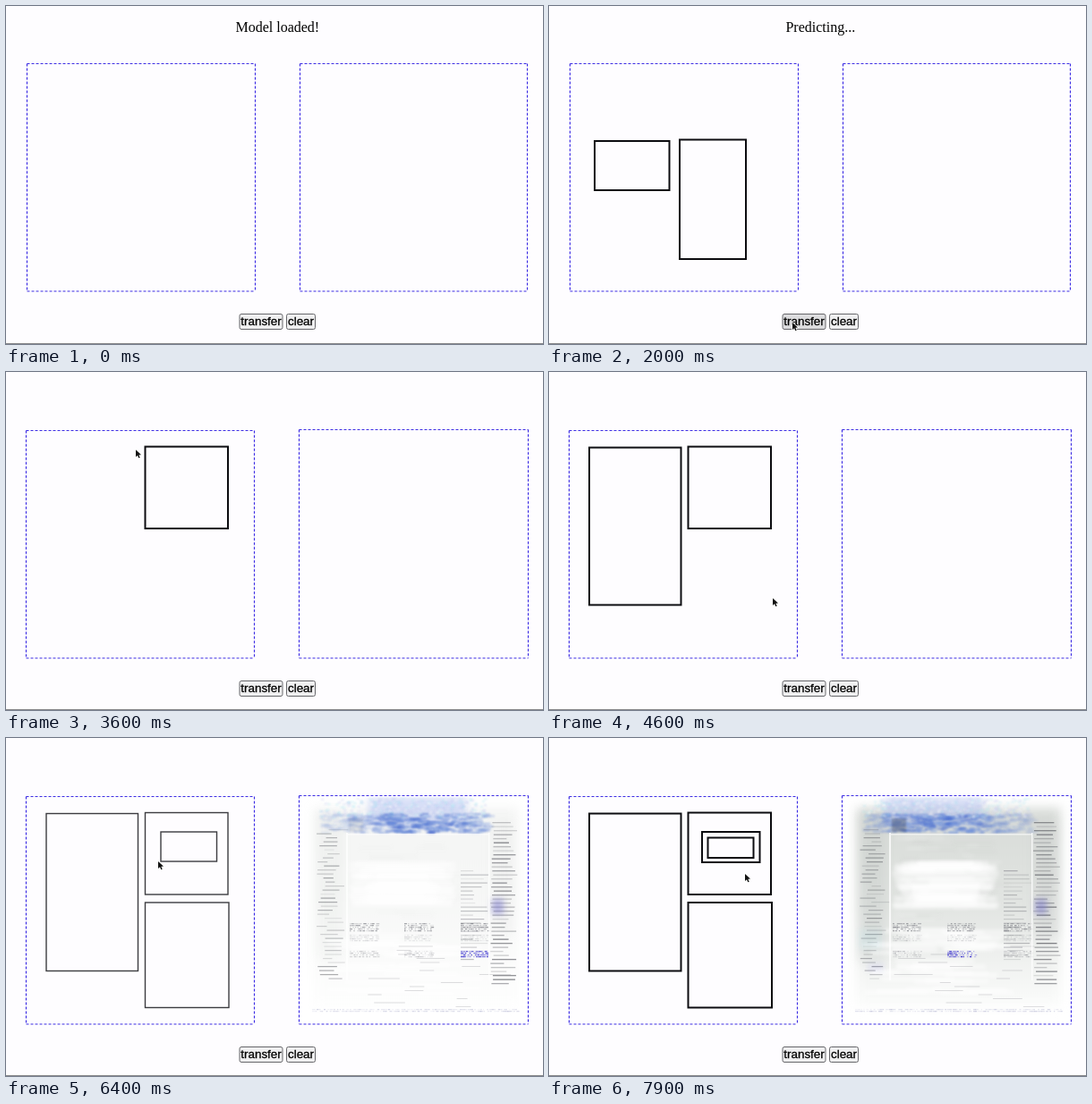
Animation of 600 by 378 pixels, one loop 8 s. Source, as an HTML page with a canvas:

```html
<!DOCTYPE html>
<html lang="en">
<head>
<meta charset="utf-8">
<title>Sketch transfer</title>
<style>
html, body { margin: 0; width: 100%; height: 100%; overflow: hidden; background: #fefdff; }
canvas { display: block; }
</style>
</head>
<body>
<canvas id="stage" width="600" height="378"></canvas>
<script>
const LOOP = 8000, STEP = 100, CLEARED = 3100;
const ctx = document.getElementById('stage').getContext('2d');

// Dragged boxes: start and end time, first and last corner
const boxes = [
  { from: 200, to: 400, a: [51, 151], b: [134.5, 206] },
  { from: 500, to: 800, a: [146, 149.5], b: [220, 283] },
  { from: 3200, to: 3500, a: [248, 83.5], b: [155.5, 175] },
  { from: 3700, to: 4000, a: [147.5, 84.5], b: [45, 260.5] },
  { from: 5000, to: 5400, a: [249, 184], b: [155.5, 301.5] },
  { from: 6200, to: 6500, a: [235.5, 105], b: [171, 139] },
  { from: 6600, to: 6900, a: [228.5, 111.5], b: [177.5, 134] }
];

// Visits to the transfer button
const visits = [
  { arrive: 1100, click: 1100, done: 2800 },
  { arrive: 4200, click: 4200, done: 4500 },
  { arrive: 5700, click: 5900, done: 6000 },
  { arrive: 7200, click: 7600, done: 7600 }
];

// The pointer passes through every drag, every visit and a few resting places
const LAG = 3;
const path = [
  ...boxes.flatMap(({ from, to, a, b }) =>
    [[from, a[0] - LAG, a[1]], [to, b[0] - LAG, b[1]]]),
  ...visits.flatMap(({ arrive, done }) => [[arrive, 272, 354], [done, 272, 354]]),
  [1000, 225, 313], [CLEARED, 328, 355], [3600, 145, 87], [4600, 250, 253],
  [5200, 165, 270], [6400, 170, 138], [7700, 220, 150], [7900, 219, 152]
].sort((p, q) => p[0] - q[0]);

function pointerAt(t) {
  const next = path.findIndex(([time]) => time > t);
  if (next === 0) return null;
  if (next < 0) return path[path.length - 1].slice(1);
  const [t0, x0, y0] = path[next - 1], [t1, x1, y1] = path[next];
  const u = (t - t0) / (t1 - t0);
  return [x0 + (x1 - x0) * u, y0 + (y1 - y0) * u];
}

function random(seed) {
  return () => {
    seed = (seed + 0x6d2b79f5) | 0;
    let v = Math.imul(seed ^ (seed >>> 15), seed | 1);
    v ^= v + Math.imul(v ^ (v >>> 7), v | 61);
    return ((v ^ (v >>> 14)) >>> 0) / 4294967296;
  };
}

// A smeared web page: haze, blue header, side columns and text patches
function makeResult({ seed, haze, peak, link, tint }) {
  const canvas = document.createElement('canvas');
  canvas.width = 600;
  canvas.height = 378;
  const g = canvas.getContext('2d'), rnd = random(seed);
  const range = (lo, hi) => lo + rnd() * (hi - lo);
  const pick = list => list[Math.floor(rnd() * list.length)];
  const bar = (color, x, y, w, h, alpha) => {
    g.globalAlpha = alpha;
    g.fillStyle = color;
    g.fillRect(x, y, w, h);
  };
  const blurred = (radius, paint) => {
    g.filter = `blur(${radius}px)`;
    paint();
    g.filter = 'none';
  };
  const words = (x, y, w, h, color, alpha) => {
    for (let row = y; row < y + h; row += 2)
      for (let at = x; at < x + w; at += range(2, 5))
        bar(color, at, row, range(1, 4), 1.3, alpha * range(.2, 1));
  };

  g.beginPath();
  g.rect(329, 66, 254, 253);
  g.clip();
  bar('#fff', 329, 66, 254, 253, 1);

  const fade = g.createLinearGradient(0, 75, 0, 300);
  fade.addColorStop(0, '#d3d7d3');
  fade.addColorStop(.5, '#dfe2df');
  fade.addColorStop(1, '#fbfcfb');
  blurred(6, () => {
    bar(fade, 344, 78, 228, 222, haze);
    bar('#c2c8c6', 346, 84, 30, 165, haze * .4);
    bar('#c2c6c6', 542, 95, 26, 125, haze * .35);
  });

  // Ragged white gaps in the middle and below
  blurred(2, () => {
    for (let i = 0; i < 45; i++) {
      const half = range(28, 60);
      bar('#fff', 443 - half, range(138, 186), half * 2, 5, .55);
      bar('#fff', range(350, 470), range(212, 285), range(30, 90), 4, .6);
      bar(pick(['#fff', '#c9cdca']), range(384, 480), range(110, 205), range(10, 55), 2, haze * .35);
    }
  });

  // Header, deepest around its peak
  blurred(5, () => bar('#a9b8f0', peak - 60, 66, 110, 30, .45));
  blurred(1, () => {
    for (let i = 0; i < 330; i++) {
      const x = range(350, 536), depth = Math.exp(-(((x - peak) / 60) ** 2));
      const shade = pick(['#3c62cc', '#5d82d8', '#7a9be0']);
      bar(shade, x, range(84, 105), range(3, 14), 2, .12 + .45 * depth);
      bar(pick(['#a5e6f4', '#c0c6f4', '#fff']), x, range(67, 88), 3, 1.5, .5);
    }
    bar('#475063', 383, 90, 16, 15, haze * .45);
  });

  // Ruled side columns
  for (let y = 94; y < 278; y += 4.5) {
    bar('#45464e', 541 + range(0, 4), y, range(14, 28), 1.3, range(.15, .65));
    if (y < 265) bar('#54565c', 347 + range(0, 14), y + 8, range(10, 22), 1.2, range(.1, .5));
    if (y > 145 && y < 250) bar('#5c5d66', 508, y, range(12, 31), 1.2, range(.1, .4));
    if (y > 205) bar('#7c7e84', range(384, 530), y + 26, range(10, 45), 1, .25);
  }

  // Three text blocks, one with a blue link
  [384, 445, 508].forEach((x, i) => {
    words(x, 207, 30, 10, '#555660', .55);
    words(x, 220, 30, 8, '#777880', .25);
    words(x, 238, 31, 7, i === link ? '#4038d0' : '#6c6d76', i === link ? .95 : .35);
  });
  words(342, 303, 230, 3, '#9a9cc0', .4);

  blurred(3, () => {
    bar('#8fe3f2', 346, 214, 26, 22, tint);
    bar('#6a70ec', 356, 252, 18, 9, tint);
    bar('#7b78cc', 543, 180, 13, 17, .5);
  });
  bar('#fff', 380, 106, 2, 165, .75);
  bar('#fff', 539, 106, 1.5, 165, .75);
  bar('#fff', 382, 107, 158, 1.5, .6);
  return canvas;
}

const strong = makeResult({ seed: 11, haze: .8, peak: 490, link: 2, tint: .6 });
const pale = makeResult({ seed: 29, haze: .25, peak: 465, link: 2, tint: 0 });
const mixed = makeResult({ seed: 47, haze: .9, peak: 435, link: 1, tint: .1 });
const results = [[0, null], [2800, pale], [CLEARED, null], [4700, strong],
  [6000, pale], [7900, mixed]];

function frame(x, y, w, h) {
  ctx.lineWidth = 1.2;
  ctx.strokeStyle = '#3d2de4';
  ctx.setLineDash([3, 2]);
  ctx.beginPath();
  for (const side of [0, 1]) {
    ctx.moveTo(x, y + side * h);
    ctx.lineTo(x + w, y + side * h);
    ctx.moveTo(x + side * w, y);
    ctx.lineTo(x + side * w, y + h);
  }
  ctx.stroke();
  ctx.setLineDash([]);
}

function button(label, x, y, w, pointer) {
  const h = 17;
  const over = pointer && pointer[0] > x && pointer[0] < x + w &&
    pointer[1] > y && pointer[1] < y + h;
  ctx.beginPath();
  ctx.roundRect(x, y, w, h, 2);
  ctx.fillStyle = over ? '#dcdcde' : '#efeff0';
  ctx.fill();
  ctx.lineWidth = 1;
  ctx.strokeStyle = '#66666a';
  ctx.stroke();
  ctx.fillStyle = ctx.strokeStyle = '#000';
  ctx.font = '13.4px "Liberation Sans", Arial, sans-serif';
  ctx.fillText(label, x + w / 2, y + 12.5);
  ctx.lineWidth = .3;
  ctx.strokeText(label, x + w / 2, y + 12.5);
}

function arrow([x, y]) {
  const tip = [[0, 0], [0, 8], [2, 6.3], [3.3, 9.3], [4.7, 8.7], [3.4, 5.8], [6, 5.6]];
  ctx.beginPath();
  tip.forEach(([dx, dy]) => ctx.lineTo(x + dx, y + dy));
  ctx.closePath();
  ctx.lineWidth = 1.4;
  ctx.strokeStyle = '#fff';
  ctx.stroke();
  ctx.fillStyle = '#111';
  ctx.fill();
}

function status(t) {
  if (t < visits[0].click) return 'Model loaded!';
  return visits.some(({ click, done }) => t >= click && t < done) ? 'Predicting...' : '';
}

function draw(t) {
  const cleared = t >= CLEARED, shift = cleared ? 1 : 0;
  const pointer = pointerAt(t);
  ctx.fillStyle = '#fefdff';
  ctx.fillRect(0, 0, 600, 378);
  ctx.fillStyle = '#8a8a8c';
  ctx.fillRect(0, 377, 600, 1);

  ctx.textAlign = 'center';
  ctx.fillStyle = '#000';
  ctx.font = '16px "Liberation Serif", "Times New Roman", serif';
  ctx.fillText(status(t), 303.3, 28.5);

  const result = results.filter(([from]) => from <= t).pop()[1];
  if (result) ctx.drawImage(result, 0, 0);
  frame(23.5 - shift, 64.5 + shift, 255, 254.5);
  frame(328.5 - shift, 64.5, 254 + 2 * shift, 254.5 + shift);

  // Lines look thinner while a box is being dragged
  const drag = boxes.find(({ from, to }) => t >= from && t < to);
  ctx.lineWidth = drag ? 1.4 : 2;
  ctx.strokeStyle = drag ? '#3c3c40' : '#0c0c10';
  for (const box of boxes) {
    if (t < box.from || (box.from >= CLEARED) !== cleared) continue;
    const [x, y] = box.a;
    const [endX, endY] = box === drag ? [pointer[0] + LAG, pointer[1]] : box.b;
    ctx.strokeRect(x, y, endX - x, endY - y);
  }

  button('transfer', 261, 344.5 + shift, 48, pointer);
  button('clear', 313.5, 344.5 + shift, 32, pointer);
  if (pointer) arrow(pointer);
}

const start = performance.now();
function tick() {
  const t = (performance.now() - start) % LOOP;
  draw(Math.floor(t / STEP) * STEP);
  requestAnimationFrame(tick);
}
tick();
</script>
</body>
</html>
```
